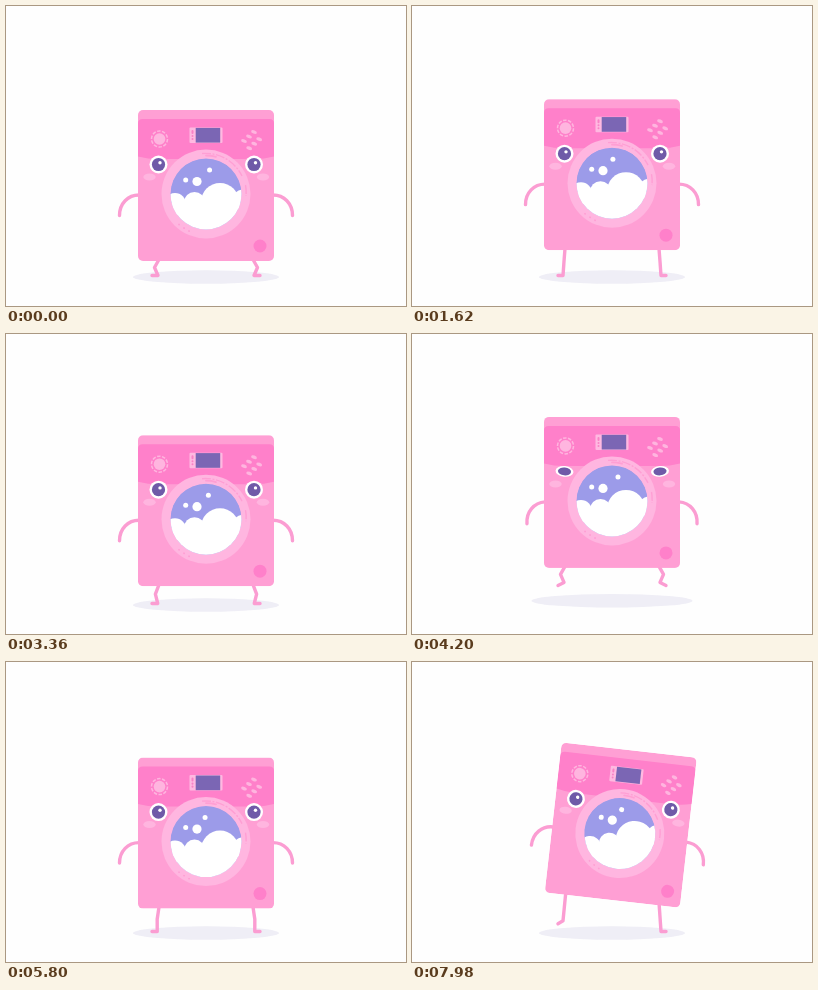
An HTML page for the animation above (8000 ms loop, 400 by 300 pixels).

```html
<!DOCTYPE html>
<html>
<head>
<meta charset="utf-8">
<title>Dancing washing machine</title>
<style>
  html, body { margin: 0; width: 100%; height: 100%; overflow: hidden; background: #fefefe; }
  svg { display: block; width: 100vw; height: 100vh; }
  .limb { fill: none; stroke: #fb9dd2; stroke-width: 3.4; stroke-linecap: round; stroke-linejoin: round; }
</style>
</head>
<body>
<svg viewBox="0 0 400 300">
  <defs>
    <clipPath id="glass"><circle r="35.5"/></clipPath>
    <clipPath id="shell"><rect x="-68" y="-75.5" width="136" height="151" rx="5"/></clipPath>
    <g id="eye">
      <circle r="9" fill="#fff"/>
      <circle r="6.6" fill="#6f5aa8"/>
    </g>
  </defs>
  <ellipse id="shadow" cx="200" cy="271" rx="73" ry="6.8" fill="#efeef6"/>
  <path id="legL" class="limb"/>
  <path id="legR" class="limb"/>
  <g id="body">
    <path id="armL" class="limb" d="M-67 9.5C-78 9.5 -86.5 18 -86.5 30"/>
    <path id="armR" class="limb" d="M67 9.5C78 9.5 86.5 18 86.5 30"/>
    <g clip-path="url(#shell)">
      <rect x="-68" y="-75.5" width="136" height="151" fill="#ff9fd4"/>
      <path d="M-68 -62Q-68 -66.5 -63.5 -66.5H63.5Q68 -66.5 68 -62V-29Q58 -26.5 48 -26.5H-48Q-58 -26.5 -68 -29Z" fill="#ff80ca"/>
    </g>
    <g fill="#ffb5df">
      <circle cx="-46.5" cy="-46.5" r="5.8"/>
      <circle cx="-46.5" cy="-46.5" r="8" fill="none" stroke="#ffb5df" stroke-width="1.5" stroke-dasharray="3.5 1.5"/>
      <g id="vents"></g>
      <ellipse cx="-56.5" cy="-8.5" rx="6.2" ry="3.5"/>
      <ellipse cx="57" cy="-8.5" rx="6.2" ry="3.5"/>
    </g>
    <rect x="-16.5" y="-58" width="33" height="15.5" rx="1" fill="#ffb9e1"/>
    <rect x="-10.3" y="-57.6" width="24.5" height="14.7" fill="#7b66b4"/>
    <path d="M-13.5 -54.5v2M-13.5 -49.5v.1M-13.5 -46.5v.1" stroke="#f982c6" stroke-width="2" stroke-linecap="round"/>
    <circle cx="54" cy="60.5" r="6.5" fill="#ff80ca"/>
    <g transform="translate(0 8.5)">
      <circle r="44.5" fill="#ffb6e0"/>
      <path d="M-4 -40.5A40.5 40.5 0 0 1 36 -18M39.5 -9A40.5 40.5 0 0 1 40 2" fill="none" stroke="#ff9fd4" stroke-width="1.4" stroke-dasharray="9 1.5 2 1.5"/>
      <path d="M0 -38.5A38.5 38.5 0 0 1 10 -37.2M-27 30.5l.1 .1M-22 34l.1 .1M-17 37l.1 .1" fill="none" stroke="#ff9fd4" stroke-width="1.8" stroke-linecap="round"/>
      <g clip-path="url(#glass)">
        <circle r="36" fill="#9c9be9"/>
        <g id="foam" fill="#fff">
          <circle cx="-31" cy="10" r="11"/>
          <circle cx="-11.5" cy="8.5" r="10.5"/>
          <circle cx="14" cy="8" r="19"/>
          <circle cx="37" cy="6" r="10.5"/>
          <rect x="-50" y="9" width="100" height="50"/>
        </g>
        <g fill="#fff">
          <circle cx="-20.3" cy="-14" r="2.5"/>
          <circle cx="-9" cy="-12.5" r="4.6"/>
          <circle id="bubble" cy="-24" r="2.5"/>
        </g>
      </g>
    </g>
    <use href="#eye" id="eyeL"/>
    <use href="#eye" id="eyeR"/>
    <g id="glints" fill="#fff">
      <circle cx="-46" cy="-22.8" r="1.7"/>
      <circle cx="49.5" cy="-22.8" r="1.7"/>
    </g>
  </g>
</svg>
<script>
const LOOP = 8000, DANCE = 5580;
const $ = id => document.getElementById(id);
const set = (id, name, value) => $(id).setAttribute(name, value);
const clamp = (v, lo, hi) => Math.min(hi, Math.max(lo, v));

// [time, value] pairs
const LEAN = [[0, 0], [340, 0], [760, -7.2], [1080, -7.2], [1460, 0], [1660, 0], [1840, 6.5],
  [2500, 6.5], [2860, 0], [DANCE, 0]];
const RISE = [[0, 0], [350, 12], [700, 0], [890, 0], [1060, 12], [1180, 11], [1400, 0], [1640, 11],
  [1860, 11], [2140, 0], [2230, 0], [2420, 12], [2500, 12], [2800, 0], [3130, 12], [3470, 0],
  [3800, 12], [4120, 0], [4850, 0], [5200, 11.5], [DANCE, 0]];
const EYES = [[0, 1], [4120, 1], [4200, 0.6], [4720, 0.6], [4880, 1], [DANCE, 1]];
const JUMP = { start: 4150, length: 680, height: 76 };

function ease(keys, t) {
  const i = keys.findIndex(k => k[0] > t);
  const [t0, a] = keys[i - 1], [t1, b] = keys[i];
  return a + (b - a) * (1 - Math.cos(Math.PI * (t - t0) / (t1 - t0))) / 2;
}

for (let i = 0; i < 6; i++) {
  const row = i % 3, col = i < 3 ? 0 : 1;
  const x = 48 - 5 * row + 5.2 * col, y = -53.5 + 4.5 * row + 7.2 * col;
  $('vents').innerHTML += `<ellipse rx="3" ry="1.7" transform="translate(${x} ${y}) rotate(20)"/>`;
}

function drawLeg(id, side, cx, cy, angle, hop) {
  const c = Math.cos(angle), s = Math.sin(angle);
  const hipX = cx + side * 47 * c - 74 * s, hipY = cy + side * 47 * s + 74 * c;
  const ground = 269.5 - hop;
  const footX = 200 + side * 49, footY = Math.min(ground, hipY + 27.5);
  const bend = clamp((27 - (footY - hipY)) / 11, 0, 1);
  const kneeX = (hipX + footX) / 2 + side * 3.5 * bend, kneeY = (hipY + footY) / 2;
  const drop = Math.min(3, Math.max(ground - footY, hop / 5));
  set(id, 'd', `M${hipX} ${hipY}L${kneeX} ${kneeY}L${footX - side * bend} ${footY}L${footX + side * 5} ${footY + drop}`);
}

function draw(time) {
  const t = time % DANCE;
  const lean = ease(LEAN, t), open = ease(EYES, t);
  const p = clamp((t - JUMP.start) / JUMP.length, 0, 1);
  const hop = 4 * JUMP.height * p * (1 - p);
  const cx = 200 + 1.35 * lean;
  const cy = 179.5 - ease(RISE, t) - 0.72 * Math.abs(lean) - hop;
  const angle = lean * Math.PI / 180;

  set('body', 'transform', `translate(${cx} ${cy}) rotate(${lean})`);
  drawLeg('legL', -1, cx, cy, angle, hop);
  drawLeg('legR', 1, cx, cy, angle, hop);

  const swing = Math.min(hop / 5, 4);
  set('armL', 'transform', `rotate(${-swing} -67 9.5)`);
  set('armR', 'transform', `rotate(${swing} 67 9.5)`);

  const tilt = (1 - open) * 14;
  set('eyeL', 'transform', `translate(-47.5 -21) rotate(${tilt}) scale(1 ${open})`);
  set('eyeR', 'transform', `translate(48 -21) rotate(${-tilt}) scale(1 ${open})`);
  set('glints', 'opacity', open > 0.75 ? 1 : 0);

  set('foam', 'transform', `rotate(${-2 * lean})`);
  set('bubble', 'cx', 2.5 + 3.5 * Math.cos((time - 880) / 1100 * 2 * Math.PI));

  const spread = Math.min(hop, 24);
  set('shadow', 'rx', 73 + 0.36 * spread);
  set('shadow', 'cy', 271 - 0.2 * spread);
}

const begin = performance.now();
function tick() {
  draw((performance.now() - begin) % LOOP);
  requestAnimationFrame(tick);
}
tick();
</script>
</body>
</html>
```
